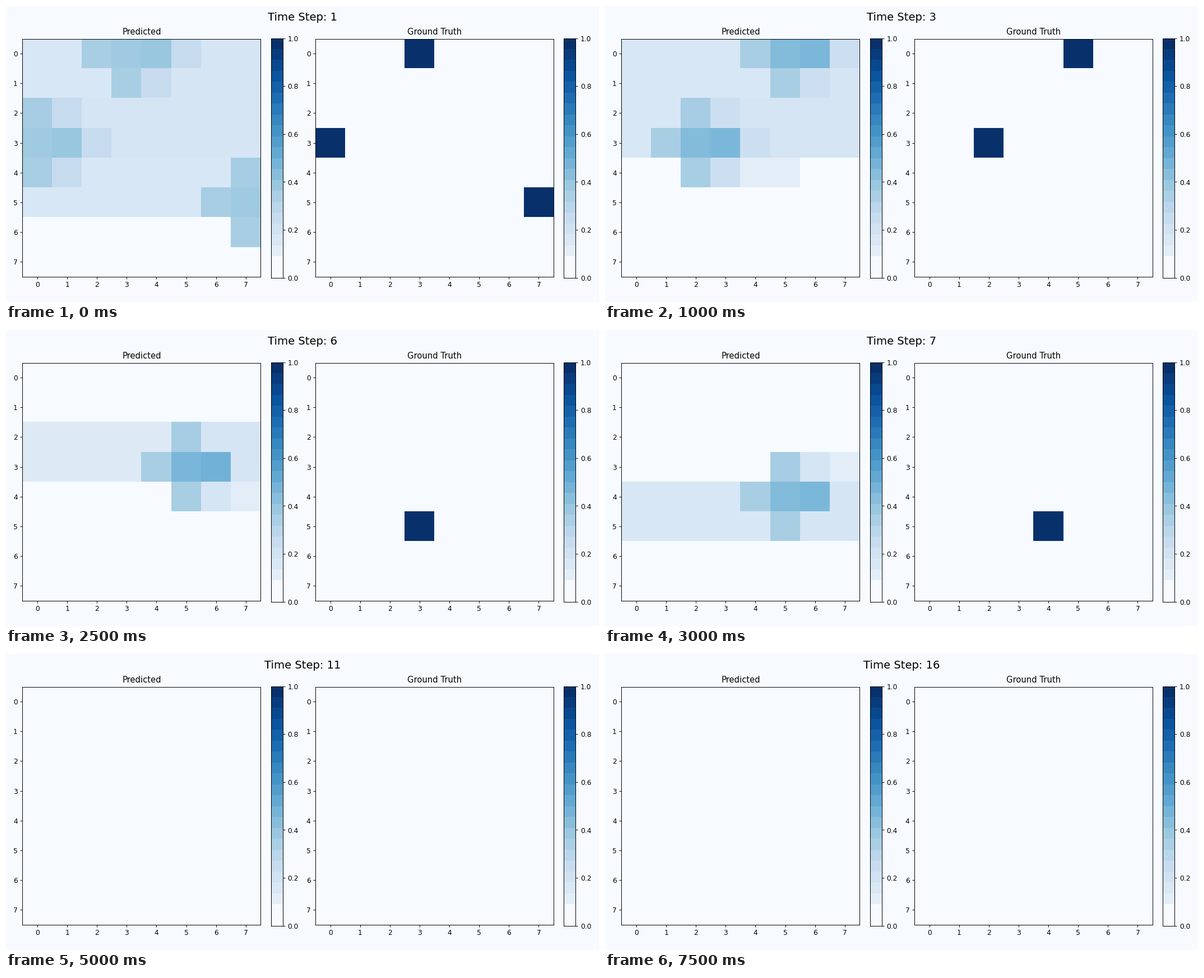
A matplotlib script for the animation above (8 s loop, 1058 by 529 pixels).

```python
import matplotlib.pyplot as plt
import numpy as np
from matplotlib.animation import FuncAnimation

W, H, DPI = 1058, 529, 88.1667
N = 8
STEPS, INTERVAL = 16, 500
LAST = 10       # the grids are empty after this step
BLUES = plt.get_cmap("Blues")

fig = plt.figure(figsize=(12, 6), dpi=DPI, facecolor=BLUES(0.0))
heading = fig.suptitle("", fontsize=16)


def walkers(step):
    """Cells that leave the grid early: one goes right, one goes down."""
    cells = []
    if step <= 3:
        cells.append((0, step + 2))
    if step <= 2:
        cells.append((step + 4, N - 1))
    return cells


def truth(step):
    grid = np.zeros((N, N))
    if step <= LAST:
        # The main cell goes right, then down a staircase
        stairs = (3 + max(0, (step - 2) // 2), min(step - 1, (step + 1) // 2))
        for cell in walkers(step) + [stairs]:
            grid[cell] = 1
    return grid


def wash(grid, r, c, step):
    """Tint the pair of rows around a head, paler behind it."""
    top = r - r % 2
    behind = .14 + .03 * np.cos(np.pi * (step - 2) / 3)
    upper, lower = (0, .105) if r >= 6 else (behind, behind)
    grid[top, :c] = upper
    grid[top + 1, :c] = lower
    grid[top:top + 2, c:] = .17


def stamp(grid, r, c, step):
    """Add a cross with a longer arm and a faint wake to the right."""
    peak = .37 + .1 * np.sin(np.pi * (step - 1) / 8)
    tail = max(.17, .26 - .015 * step)
    arms = {(0, 0): peak, (0, 1): peak + .02, (0, 2): tail,
            (-1, 0): .35, (0, -1): .34, (1, 0): .34,
            (-1, 1): tail, (1, 1): tail,
            (-1, 2): .105, (1, 2): .105, (1, 3): .105}
    for (dr, dc), value in arms.items():
        y, x = r + dr, c + dc
        if 0 <= y < N and 0 <= x < N:
            grid[y, x] = max(grid[y, x], value)


def predicted(step):
    grid = np.zeros((N, N))
    if step <= LAST:
        # The main head runs along row 3, then drops down column 5
        head = (3 + max(0, step - 6), min(step - 1, 5))
        heads = walkers(step) + [head]
        for paint in (wash, stamp):
            for r, c in heads:
                paint(grid, r, c, step)
    return grid


def add_axes(x0, x1, y0, y1):
    return fig.add_axes([x0 / W, 1 - y1 / H, (x1 - x0) / W, (y1 - y0) / H])


def panel(x, title):
    ax = add_axes(x, x + 424.9, 58.6, 483.6)
    cells = ax.imshow(np.zeros((N, N)), cmap=BLUES, vmin=0, vmax=1,
                      aspect="auto", interpolation="nearest")
    ax.set_title(title, fontsize=12)
    ax.set_xticks(range(N))
    ax.set_yticks(range(N))

    cax = add_axes(x + 443.3, x + 464.3, 57.7, 485.7)
    bands = np.linspace(0, 1, 22)
    bands[1] = 0
    cax.imshow(bands[:, None], cmap=BLUES, origin="lower", aspect="auto",
               extent=(0, 1, 0, 1), interpolation="nearest")
    cax.set_xticks([])
    cax.set_yticks(np.linspace(0, 1, 6))
    cax.yaxis.tick_right()
    return cells


panels = [(panel(29.45, "Predicted"), predicted),
          (panel(552.1, "Ground Truth"), truth)]


def update(i):
    step = i + 1
    heading.set_text(f"Time Step: {step}")
    for cells, grid in panels:
        cells.set_data(grid(step))
    return []


anim = FuncAnimation(fig, update, frames=STEPS, interval=INTERVAL,
                     repeat=True, repeat_delay=0)
plt.show()
```
